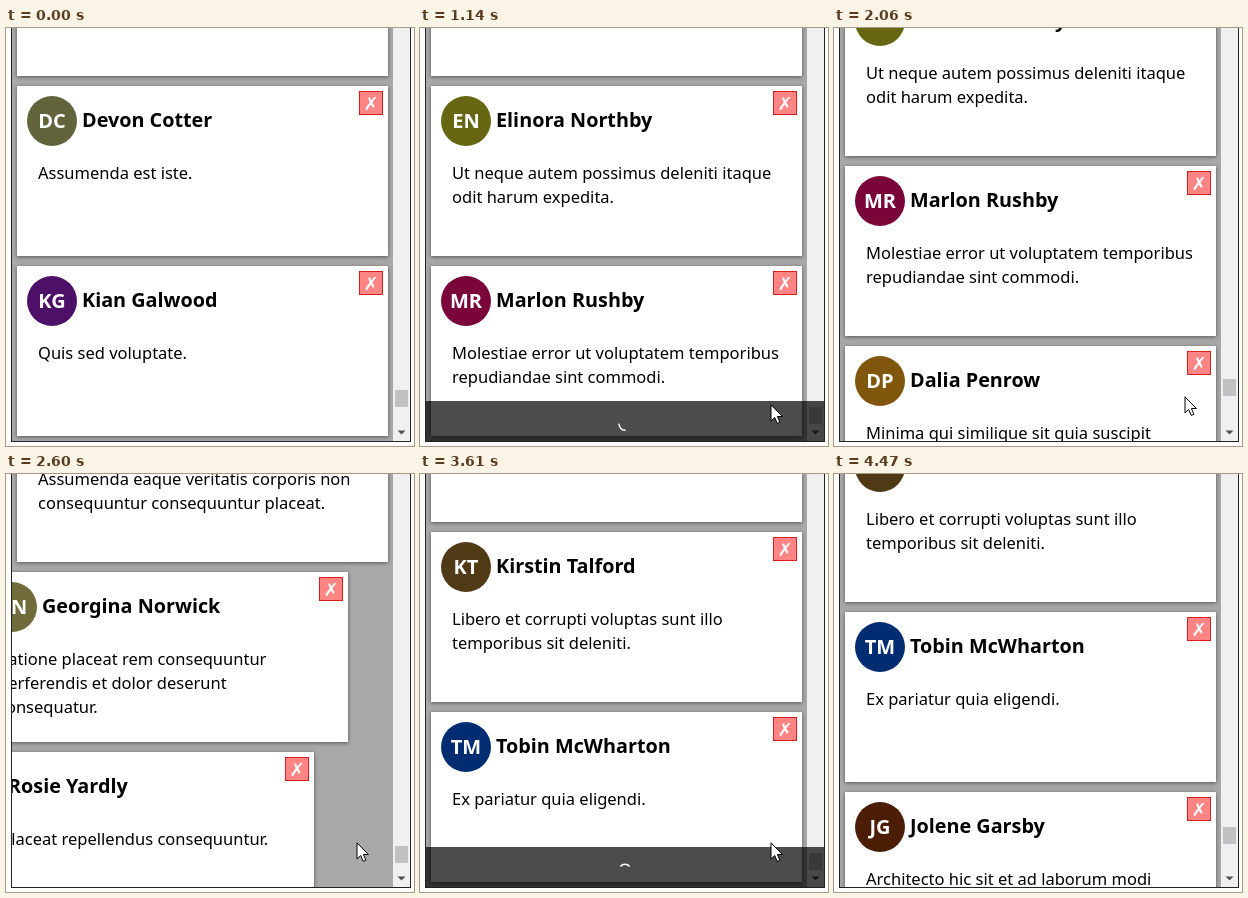
These frames come from a looping animation (408x418 px, 4850 ms). An HTML page:

```html
<!DOCTYPE html>
<html lang="en">
<head>
<meta charset="utf-8">
<title>Endless card list</title>
<style>
html, body { margin: 0; width: 100%; height: 100%; overflow: hidden; background: #fff; }
body { position: relative; font: 16.5px/24px "Noto Sans", "Open Sans", sans-serif; color: #000; }
div, svg, b, p { position: absolute; margin: 0; }
#view { left: 5px; top: -1px; width: 398px; height: 413px; border: 1px solid #222; overflow: hidden; background: #a9a9a9; }
.card { left: 5px; top: 0; width: 371px; height: 170px; background: #fff; box-shadow: 0 1px 4px rgba(0,0,0,.5); }
.dot { left: 10px; top: 10px; width: 50px; height: 50px; border-radius: 50%; color: #fff; font: bold 20px/50px "Noto Sans", "Open Sans", sans-serif; text-align: center; }
.card b { left: 65px; top: 20px; font-size: 19.8px; line-height: 28px; white-space: nowrap; }
.card p { left: 21px; top: 75px; white-space: pre; }
.del { left: 342px; top: 5px; width: 22px; height: 22px; border: 1px solid #d81e1e; background: #ff8585; color: #fff; font: bold 18px/23px "DejaVu Sans", sans-serif; text-align: center; }
#bar { left: 381px; top: 0; width: 17px; height: 413px; background: #f0f0f1; }
#thumb { left: 2px; top: 0; width: 13px; height: 17px; background: #c1c1c4; }
#bar svg { left: 4px; top: 402px; }
#load { left: 0; top: 373px; width: 398px; height: 40px; background: rgba(0,0,0,.7); }
#load svg { left: 191px; top: 15px; }
#mouse { left: 0; top: 0; }
</style>
</head>
<body>
<div id="view">
  <div id="list"></div>
  <div id="bar">
    <div id="thumb"></div>
    <svg width="9" height="6"><path d="M.5 .5h8L4.500 4.500z" fill="#505050"/></svg>
  </div>
  <div id="load">
    <svg width="16" height="16"><path id="arc" d="M3.400 4.400A6 6 0 0 1 12.600 4.400" fill="none" stroke="#fff" stroke-width="1.5"/></svg>
  </div>
</div>
<svg id="mouse" width="16" height="24"><path d="M1 .8V17l3.700-3.500 2.500 5.900 2.700-1.200-2.500-5.700h5z" fill="#fff" stroke="#000"/></svg>
<script>
const LOOP = 4850, PITCH = 180, FIRST = -7, SLIDE = 310;

// name | colour | text, top to bottom
const people = [
  "Olga Fenwright|#2f5a4a|Velit quo autem.",
  "Devon Cotter|#61633b|Assumenda est iste.",
  "Kian Galwood|#4c1068|Quis sed voluptate.",
  "Lorna Haskin|#1f5a62|Dolores et quia nemo\nvoluptas rerum.",
  "Peter Ashmoor|#5a2c1c|Sunt omnis ut eligendi.",
  "Selma Brantley|#234f1c|Nihil earum quos\nitaque facere.",
  "Elinora Northby|#676612|Ut neque autem possimus deleniti itaque\nodit harum expedita.",
  "Marlon Rushby|#7a0639|Molestiae error ut voluptatem temporibus\nrepudiandae sint commodi.",
  "Dalia Penrow|#80560c|Minima qui similique sit quia suscipit\nvoluptas.",
  "Hester Oakdale|#2c3a70|Eos dolor quisquam.",
  "Victor Lanham|#6a2350|Quam vel atque sit.",
  "Nadia Copeland|#165a38|Fugit ipsa omnis et.",
  "Simon Wexley|#54301a|Rerum nobis aut.",
  "Alina Drumford|#3c2a6c|Assumenda eaque veritatis corporis non\nconsequuntur consequuntur placeat.",
  "Georgina Norwick|#716c3b|Ratione placeat rem consequuntur\nperferendis et dolor deserunt\nconsequatur.",
  "Rosie Yardly|#235c66|Ipsa placeat repellendus consequuntur.",
  "Kirstin Talford|#503a15|Libero et corrupti voluptas sunt illo\ntemporibus sit deleniti.",
  "Tobin McWharton|#002d72|Ex pariatur quia eligendi.",
  "Jolene Garsby|#4c1d05|Architecto hic sit et ad laborum modi\nquidem."
];

// bursts of screen updates: first, last, count
const bursts = [
  [0, 0, 1], [70, 370, 5], [600, 680, 2], [830, 990, 3], [1140, 1370, 4],
  [1520, 1980, 7], [2060, 2060, 1], [2210, 2290, 2], [2600, 2900, 5],
  [3070, 3220, 3], [3390, 3610, 4], [3780, 4240, 7], [4320, 4470, 3]
];
const ticks = bursts.flatMap(([a, b, n]) =>
  Array.from({ length: n }, (_, i) => n > 1 ? a + (b - a) * i / (n - 1) : a));

const scrollKeys = [
  [0, -900], [370, -200], [520, -200], [680, 0], [2130, 0], [2290, 100],
  [2520, 100], [2600, 1300], [2825, 1700], [LOOP, 1700]
];
const slideStart = { 1: 1750, 7: 2388, 8: 2423, 9: 2510, 10: 2590, 11: 4010 };

const $ = id => document.getElementById(id);
const clamp = u => Math.max(0, Math.min(1, u));
const easeOut = u => 1 - (1 - clamp(u)) ** 2;

function add(parent, tag, cls, text) {
  const el = document.createElement(tag);
  el.className = cls;
  el.textContent = text;
  return parent.appendChild(el);
}

const cards = people.map(row => {
  const [name, color, text] = row.split("|");
  const card = add($("list"), "div", "card", "");
  const initials = name.split(" ").map(w => w[0]).join("");
  add(card, "div", "dot", initials).style.background = color;
  add(card, "b", "", name);
  add(card, "p", "", text);
  add(card, "div", "del", "✗");
  return card;
});

function track(keys, t) {
  const i = Math.max(1, keys.findIndex(k => k[0] >= t));
  const [t0, v0] = keys[i - 1], [t1, v1] = keys[i];
  return v0 + (v1 - v0) * clamp((t - t0) / (t1 - t0));
}

// each loaded batch is followed by one wheel notch
const notch = (t, start) => 100 * easeOut((t - start) / 312);

function place(el, x, y) {
  el.style.transform = `translate(${x}px,${y}px)`;
}

function draw(time) {
  const t = ticks.filter(k => k <= time + .01).pop();
  const scroll = Math.round(track(scrollKeys, t) + notch(t, 1562) + notch(t, 3822));

  cards.forEach((card, i) => {
    const n = i + FIRST;
    const start = n < 1 ? -SLIDE : slideStart[n] || 2290;
    const x = Math.round(400 * (easeOut((t - start) / SLIDE) - 1));
    const y = 238 + PITCH * n - scroll;
    card.style.display = y > -180 && y < 420 && x > -400 ? "" : "none";
    place(card, x, y);
  });

  const [end, ratio] = t < 1520 ? [0, 53] : t < 3780 ? [1800, 60] : [3600, 65];
  place($("thumb"), 0, Math.round(379 - (end - scroll) / ratio));

  const began = t < 2000 ? 640 : 2810;
  const busy = t >= began && t < (t < 2000 ? 1520 : 3780);
  $("load").style.display = busy ? "" : "none";
  $("arc").setAttribute("transform", `rotate(${(t - began) / 800 * 360} 8 8.2)`);

  const leave = clamp((t - 4240) / 155);
  $("mouse").style.display = t >= 1140 && t < 4470 ? "" : "none";
  place($("mouse"), 350 + 27 * leave, (t < 1520 ? 376 : 368) + 32 * leave);
}

const began = performance.now();
function loop() {
  draw((performance.now() - began) % LOOP);
  requestAnimationFrame(loop);
}
loop();
</script>
</body>
</html>
```
